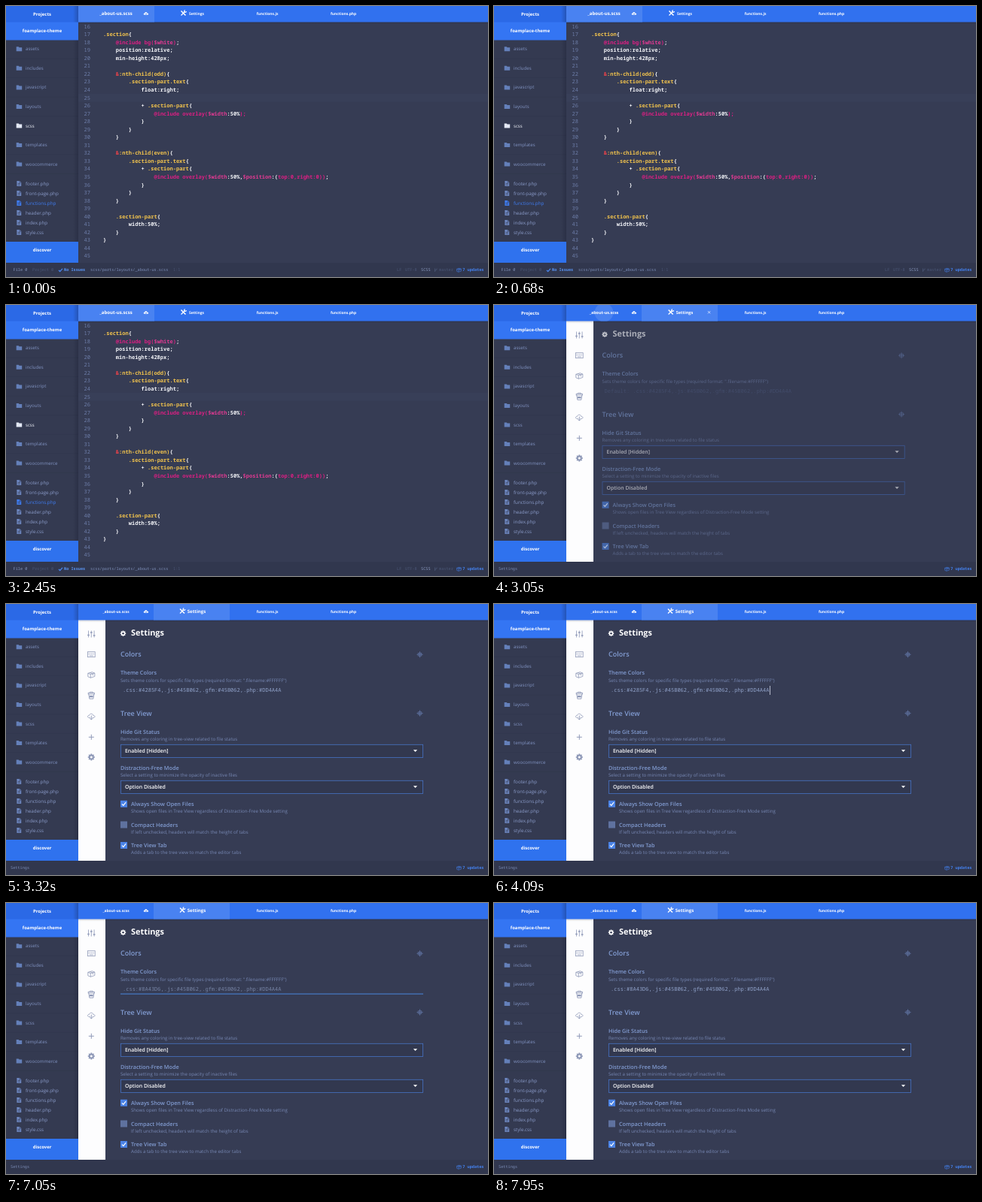
Animation of 640x361 px, one loop 8000 ms. Source, as an HTML page with a canvas:

```html
<!DOCTYPE html>
<html lang="en">
<head>
<meta charset="utf-8">
<title>Editor theme settings</title>
<style>
html, body { margin: 0; width: 100%; height: 100%; overflow: hidden; background: #363c54; }
canvas { display: block; width: 640px; height: 361px; }
</style>
</head>
<body>
<canvas id="stage"></canvas>
<script>
const W = 640, H = 361, LOOP = 8000;
const canvas = document.getElementById('stage');
const dpr = window.devicePixelRatio || 1;
canvas.width = W * dpr;
canvas.height = H * dpr;
const c = canvas.getContext('2d');
c.scale(dpr, dpr);
c.textRendering = 'geometricPrecision';

const SANS = '"Open Sans", "Noto Sans", sans-serif';
const MONO = '"Noto Sans Mono", "DejaVu Sans Mono", monospace';
const CODE = 7.03, CHAR = CODE * 0.6, LINE = CODE * 1.5;
const BG = '#363c54', SIDE = '#343a51', DIM = '#4c5878', MUTED = '#8193c2';
const ICON = '#8f99b8', HEAD = '#829cd2', NOTE = '#7788b4';

const SWITCH = 2830, LOADED = 3300, FOCUS = 4050, BLUR = 7220;
const MOVE = 4210, STEP = 30, ERASE = 5620, TYPE = 6060;

const clamp = v => Math.max(0, Math.min(1, v));
const ease = v => { v = clamp(v); return v * v * (3 - 2 * v); };
const mix = (a, b, k) => a + (b - a) * k;

function rect(x, y, w, h, color) {
  c.fillStyle = color;
  c.fillRect(x, y, w, h);
}

// y is the optical middle of the line
function text(s, x, y, size, color, { weight = 400, align = 'left', font = SANS } = {}) {
  c.font = `${weight} ${size}px ${font}`;
  c.textAlign = align;
  c.fillStyle = color;
  c.fillText(s, x, y + size * 0.33);
}

function mono(s, x, y, color, weight = 400, size = CODE) {
  text(s, x, y, size, color, { weight, font: MONO });
}

function stroke(points, color, width = 1) {
  c.strokeStyle = color;
  c.lineWidth = width;
  c.beginPath();
  points.forEach(([x, y], i) => i ? c.lineTo(x, y) : c.moveTo(x, y));
  c.stroke();
}

function fill(points, color) {
  c.fillStyle = color;
  c.beginPath();
  points.forEach(([x, y]) => c.lineTo(x, y));
  c.fill();
}

function box(x, y, w, h, color, width = 0.8) {
  c.strokeStyle = color;
  c.lineWidth = width;
  c.strokeRect(x, y, w, h);
}

function disc(x, y, r, color) {
  c.fillStyle = color;
  c.beginPath();
  c.arc(x, y, r, 0, Math.PI * 2);
  c.fill();
}

function shade(x, y, w, h, x1, y1, alpha) {
  const g = c.createLinearGradient(x, y, x1, y1);
  g.addColorStop(0, `rgba(16,20,40,${alpha})`);
  g.addColorStop(1, 'rgba(16,20,40,0)');
  c.fillStyle = g;
  c.fillRect(Math.min(x, x1), y, w, h);
}

function at(x, y, draw) {
  c.save();
  c.translate(x, y);
  draw();
  c.restore();
}

function gear(x, y, r, color, hole) {
  at(x, y, () => {
    for (let i = 0; i < 8; i++) {
      c.rotate(Math.PI / 4);
      rect(-r * 0.2, -r, r * 0.4, r * 0.5, color);
    }
    disc(0, 0, r * 0.76, color);
    disc(0, 0, r * 0.34, hole);
  });
}

function cloud(x, y, s, color, hollow) {
  at(x, y, () => {
    c.scale(s, s);
    c.beginPath();
    c.moveTo(-3, 2);
    c.bezierCurveTo(-6, 2, -5.5, -1.6, -3, -1.2);
    c.bezierCurveTo(-2.4, -4.4, 2.4, -4.2, 2.5, -1.2);
    c.bezierCurveTo(5.6, -1.6, 5.6, 2, 3, 2);
    c.closePath();
    if (hollow) {
      c.strokeStyle = color;
      c.lineWidth = 0.8;
      c.stroke();
    } else {
      c.fillStyle = color;
      c.fill();
    }
  });
}

function tools(x, y) {
  stroke([[x - 3, y - 3], [x + 3, y + 3]], '#fff', 1.5);
  stroke([[x + 2, y - 2], [x - 3, y + 3]], '#fff', 1.2);
  c.lineWidth = 1.2;
  c.beginPath();
  c.arc(x + 2.5, y - 2.5, 1.4, 0, Math.PI * 1.45);
  c.stroke();
}

function parcel(x, y, s, color) {
  at(x, y, () => {
    c.scale(s, s);
    stroke([[-4.5, -2], [1, -3.6], [4.5, -2.2], [4.5, 2.2], [-1, 4], [-4.5, 2.5], [-4.5, -2], [-1, -0.7], [4.5, -2.2]], color, 0.8);
    stroke([[-1, -0.7], [-1, 4]], color, 0.8);
    stroke([[-2, -2.8], [2, -1.4], [2, 1]], color, 0.8);
  });
}

function folder(x, y, color) {
  fill([[x, y - 3], [x + 3, y - 3], [x + 4, y - 2], [x + 7.5, y - 2], [x + 7.5, y + 3], [x, y + 3]], color);
}

function file(x, y, color) {
  fill([[x, y - 3.6], [x + 3.6, y - 3.6], [x + 5.8, y - 1.4], [x + 5.8, y + 3.6], [x, y + 3.6]], color);
  for (const d of [0, 1.8]) stroke([[x + 1.3, y + d], [x + 4.5, y + d]], SIDE, 0.7);
  stroke([[x + 3.5, y - 3.2], [x + 3.5, y - 1.3], [x + 5.6, y - 1.3]], SIDE, 0.6);
}

const folders = ['assets', 'includes', 'javascript', 'layouts', 'scss', 'templates', 'woocommerce'];
const files = ['footer.php', 'front-page.php', 'functions.php', 'header.php', 'index.php', 'style.css'];

function sidebar(coding) {
  rect(0, 0, 96, 342, SIDE);
  folders.forEach((name, i) => {
    const y = 57.3 + i * 25.55, on = coding && name === 'scss';
    rect(0, y + 12.4, 96, 0.8, '#31374d');
    folder(13.7, y, on ? '#e4e9f6' : '#6480ba');
    text(name, 26, y, 6.15, on ? '#f2f5fc' : MUTED);
  });
  files.forEach((name, i) => {
    const y = 236.5 + i * 13, on = coding && name === 'functions.php';
    file(14.4, y, on ? '#3f7df2' : '#6e88c2');
    text(name, 26, y, 6.25, on ? '#3f7df2' : '#8a9bc9');
  });
  rect(0, 0, 96, 22, '#2b69e6');
  shade(96, 0, 7, 342, 89, 0, 0.25);
  rect(0, 21.5, 96, 24, '#3475f3');
  rect(0, 314, 96, 28, '#2f72ee');
  const bold = { weight: 700, align: 'center' };
  text('Projects', 48, 11, 5.95, '#fff', bold);
  text('foamplace-theme', 48, 33.5, 5.95, '#fff', bold);
  text('discover', 48, 325.5, 5.95, '#fff', bold);
}

function ripple(x, cx, r) {
  if (r <= 0) return;
  c.save();
  c.beginPath();
  c.rect(x, 0, 101, 21.5);
  c.clip();
  disc(cx, 10, r, '#4982f1');
  c.restore();
}

function tabs(k, t) {
  rect(96, 0, W - 96, 21.5, '#3171ef');
  ripple(96, 146, 70 * (1 - k) ** 2);
  ripple(196, 247, 110 * k);
  const tab = (name, x, on) =>
    text(name, x, 10, mix(4.95, 6.1, on), '#fff', { weight: 700, align: 'center' });
  tab('_about-us.scss', 146, 1 - k);
  tab('Settings', 253, k);
  tab('functions.js', 347, 0);
  tab('functions.php', 448, 0);
  cloud(186, 10.5, 0.65, '#fff');
  disc(186, 10.6, 0.8, '#3f7df2');
  tools(mix(235.5, 234, k), 9.5);
  if (t > 2650 && t < 3300) {
    for (const d of [-1, 1]) stroke([[284, 9.7 - 1.6 * d], [287.2, 9.7 + 1.6 * d]], '#dbe6ff', 0.9);
  }
  shade(96, 21.5, W - 96, 3, 96, 24.5, 0.16);
}

const inks = { y: '#f4c54d', w: '#f3f4f8', p: '#dc1f83', v: '#e23a92', r: '#f0434a' };
// number: indent, then pieces led by an ink letter
const source = {
  17: [0, 'y.section', 'w{'],
  18: [1, 'p@include bg(', 'v$white', 'p)', 'w;'],
  19: [1, 'wposition:relative;'],
  20: [1, 'wmin-height:428px;'],
  22: [1, 'r&', 'y:nth-child(odd)', 'w{'],
  23: [2, 'y.section-part.text', 'w{'],
  24: [3, 'wfloat:right;'],
  26: [3, 'w+ ', 'y.section-part', 'w{'],
  27: [4, 'p@include overlay(', 'v$width', 'w:50%', 'p);'],
  28: [3, 'w}'],
  29: [2, 'w}'],
  30: [1, 'w}'],
  32: [1, 'r&', 'y:nth-child(even)', 'w{'],
  33: [2, 'y.section-part.text', 'w{'],
  34: [3, 'w+ ', 'y.section-part', 'w{'],
  35: [4, 'p@include overlay(', 'v$width', 'w:50%,', 'v$position', 'w:(', 'ptop:0,right:0))', 'w;'],
  36: [3, 'w}'],
  37: [2, 'w}'],
  38: [1, 'w}'],
  40: [1, 'y.section-part', 'w{'],
  41: [2, 'wwidth:50%;'],
  42: [1, 'w}'],
  43: [0, 'w}']
};

function codeView() {
  rect(96, 117, W - 96, LINE, '#383f58');
  for (let n = 16; n <= 45; n++) {
    const y = 27.3 + (n - 16) * LINE;
    mono(String(n), 103.6, y, '#6d7da8');
    const [indent, ...parts] = source[n] || [0];
    let x = 129 + indent * 4 * CHAR;
    for (const part of parts) {
      mono(part.slice(1), x, y, inks[part[0]], 600);
      x += (part.length - 1) * CHAR;
    }
  }
}

function iconBar() {
  rect(96, 21, 36, 321, '#fdfdfe');
  [[109.5, 41.5], [113.3, 38], [117.1, 42]].forEach(([x, knob]) => {
    stroke([[x, 35.5], [x, 44.5]], ICON, 0.8);
    rect(x - 1.3, knob - 0.8, 2.6, 1.5, ICON);
  });
  box(108.4, 63.7, 9.8, 7, ICON);
  for (const y of [65.7, 67.2]) {
    c.setLineDash([1, 0.8]);
    stroke([[109.5, y], [117.3, y]], ICON, 0.7);
    c.setLineDash([]);
  }
  stroke([[110.8, 69], [115.8, 69]], ICON, 0.7);
  parcel(113.3, 94.3, 1, ICON);
  stroke([[109.8, 120], [110.8, 126.3], [115.8, 126.3], [116.8, 120]], ICON, 0.9);
  box(109.2, 118.5, 8.2, 1.6, ICON);
  rect(111, 122, 4.6, 2.4, ICON);
  stroke([[110.2, 118.4], [111.4, 117.2], [115.2, 117.2], [116.4, 118.4]], ICON, 0.8);
  cloud(113.3, 149.6, 0.95, ICON, true);
  rect(112, 149.5, 2.6, 3, '#fdfdfe');
  stroke([[113.3, 148.6], [113.3, 154]], ICON, 0.9);
  stroke([[111.5, 152.2], [113.3, 154.2], [115.1, 152.2]], ICON, 0.9);
  stroke([[109.8, 177.3], [116.8, 177.3]], ICON);
  stroke([[113.3, 173.8], [113.3, 180.8]], ICON);
  gear(113.3, 204, 4.5, ICON, '#fdfdfe');
}

function heading(name, y) {
  text(name, 152, y, 9.05, HEAD, { weight: 600 });
  const ink = '#667cae';
  stroke([[545.5, y], [553.5, y]], ink, 0.8);
  stroke([[549.5, y - 4], [549.5, y + 4]], ink, 0.8);
  box(547.2, y - 1.8, 4.6, 3.6, ink, 0.6);
}

function label(name, note, x, y, gap = 9.7) {
  text(name, x, y, 7.25, HEAD, { weight: 600 });
  text(note, x, y + gap, 6.13, NOTE);
}

function select(value, y) {
  rect(152, y, 402, 17.6, '#32384f');
  box(152.4, y + 0.3, 401.2, 17.1, '#4672c4', 0.8);
  text(value, 158, y + 8.4, 6.95, '#fff', { weight: 600 });
  fill([[540.8, y + 7.2], [546.2, y + 7.2], [543.5, y + 10.1]], '#fff');
}

function check(on, name, note, y) {
  rect(152, y - 4.7, 9, 9, on ? '#4b83e6' : '#5f729f');
  if (on) stroke([[154, y], [155.8, y + 1.9], [159.2, y - 2.4]], '#fff', 1.2);
  label(name, note, 166, y, 9.4);
}

function fieldState(t) {
  const start = '.css:#', tail = ',.js:#45B062,.gfm:#45B062,.php:#DD4A4A';
  const erased = Math.max(0, Math.min(6, Math.floor((t - ERASE) / 60) + 1));
  const typed = Math.max(0, Math.min(6, Math.floor((t - TYPE) / 130) + 1));
  const body = typed ? '8A43D6'.slice(0, typed) : '4285F4'.slice(erased);
  const steps = Math.max(0, Math.floor((t - MOVE) / STEP));
  return {
    value: start + body + tail,
    caret: typed ? 6 + typed : Math.max(6, 50 - steps)
  };
}

function field(t) {
  if (t < LOADED) {
    mono('Default: .css:#4285F4,.js:#45B062,.gfm:#45B062,.php:#DD4A4A', 155, 114.5, '#4c587a');
    return;
  }
  const { value, caret } = fieldState(t);
  const focus = ease((t - MOVE) / 250) * (1 - ease((t - BLUR) / 180));
  const ink = [[145, 119], [163, 132], [203, 165]].map(([a, b]) => Math.round(mix(a, b, focus)));
  mono(value, 155, 114.5, `rgb(${ink})`);
  if (focus > 0) rect(353 - 201 * focus, 120.6, 402 * focus, 1, '#4a86dc');
  const idle = t - TYPE - 780;
  const visible = idle < 0 || Math.floor(idle / 180) % 2 === 0;
  if (t >= FOCUS && t < BLUR && visible) rect(155.2 + caret * CHAR, 109, 0.8, 12, '#d3d9e8');
}

function settingsView(k, t) {
  c.save();
  c.beginPath();
  c.rect(132, 21, W - 132, 321);
  c.clip();
  c.translate(-20 * (1 - k), 0);
  c.globalAlpha = k;
  gear(155.5, 39.2, 3.7, '#fff', BG);
  text('Settings', 166, 38, 10.9, '#fff', { weight: 700 });
  heading('Colors', 67.3);
  label('Theme Colors', 'Sets theme colors for specific file types (required format: ".filename:#FFFFFF")', 152, 92);
  field(t);
  heading('Tree View', 145.6);
  label('Hide Git Status', 'Removes any coloring in tree-view related to file status', 152, 170.4);
  select('Enabled [Hidden]', 187);
  label('Distraction-Free Mode', 'Select a setting to minimize the opacity of inactive files', 152, 218.4);
  select('Option Disabled', 235);
  check(true, 'Always Show Open Files', 'Shows open files in Tree View regardless of Distraction-Free Mode setting', 266.5);
  check(false, 'Compact Headers', 'If left unchecked, headers will match the height of tabs', 294.2);
  check(true, 'Tree View Tab', 'Adds a tab to the tree view to match the editor tabs', 321.7);
  c.restore();
}

function statusBar(coding) {
  rect(0, 342, W, 19, '#31374e');
  const item = (s, x, color, weight) => mono(s, x, 351.6, color, weight, 5.22);
  if (coding) {
    item('File 0', 9.5, '#8796bd');
    item('Project 0', 35, DIM);
    stroke([[70, 352], [71.7, 353.7], [75, 349.8]], '#4b8af5', 1.2);
    item('No Issues', 77, '#5b95f3', 600);
    item('scss/parts/layouts/_about-us.scss', 112, '#7f90ba');
    item('1:1', 222, DIM);
    item('LF', 519, DIM);
    item('UTF-8', 530, DIM);
    item('SCSS', 551, '#8c9bc2');
    stroke([[569.5, 349.5], [569.5, 354]], DIM, 0.8);
    stroke([[572, 349.5], [572, 351], [569.5, 352.5]], DIM, 0.8);
    item('master', 575, DIM);
  } else {
    item('Settings', 6, '#7c8db8');
  }
  parcel(601.5, 351.7, 0.65, '#4584f3');
  item('7 updates', 606.3, '#4584f3', 600);
}

function draw(t) {
  const coding = t < SWITCH, k = ease((t - SWITCH) / 400);
  rect(0, 0, W, H, BG);
  if (coding) {
    codeView();
  } else {
    settingsView(k, t);
    iconBar();
  }
  tabs(k, t);
  sidebar(coding);
  statusBar(coding);
}

const begin = performance.now();
function tick() {
  draw((performance.now() - begin) % LOOP);
  requestAnimationFrame(tick);
}
tick();
</script>
</body>
</html>
```
